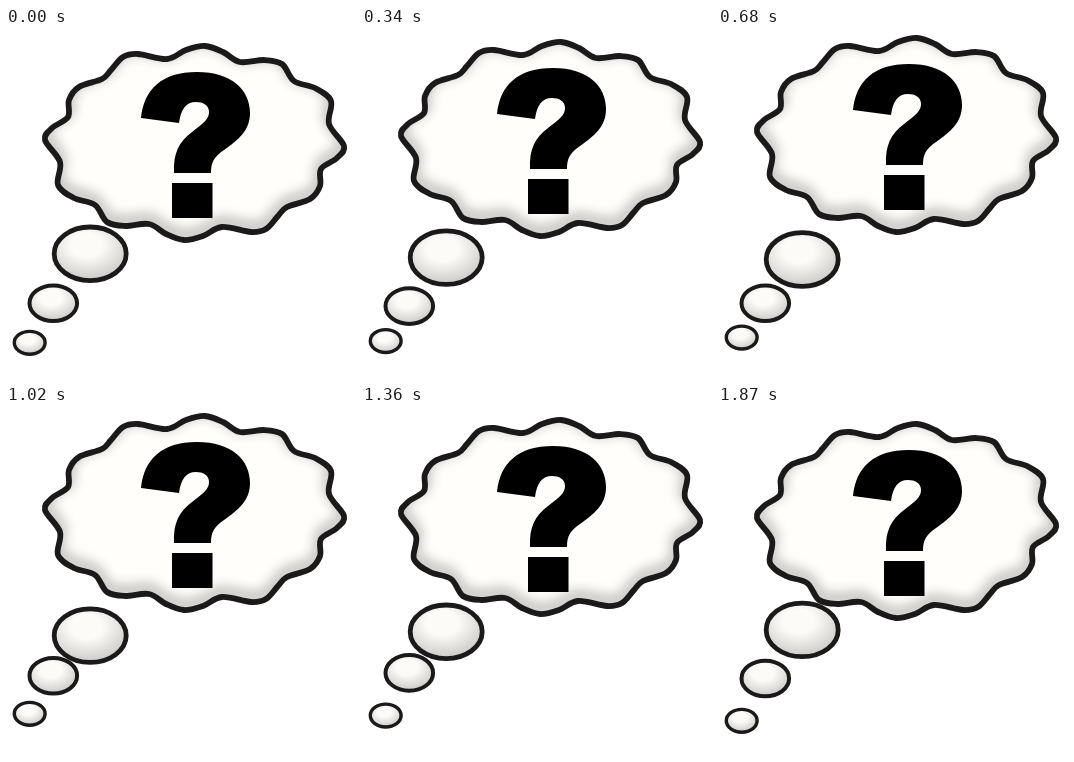
An HTML page that plays this animation: 350x350 px, repeating every 2040 ms.

```html
<!DOCTYPE html>
<html lang="en">
<head>
<meta charset="utf-8">
<title>Thought bubble</title>
<style>
  html, body { margin: 0; width: 100%; height: 100%; overflow: hidden; background: #fff; }
  svg { display: block; width: 100vw; height: 100vh; }
  ellipse { fill: url(#shade); stroke: #1a1a1a; }
  .line { fill: none; stroke: #1a1a1a; }
</style>
</head>
<body>
<svg viewBox="0 0 350 350" role="img" aria-label="Thought bubble with a question mark">
  <defs>
    <path id="outline"/>
    <clipPath id="inside"><use href="#outline"/></clipPath>
    <filter id="soft" x="-20%" y="-20%" width="140%" height="140%">
      <feGaussianBlur stdDeviation="6"/>
    </filter>
    <radialGradient id="shade" cx=".45" cy=".34" r=".64">
      <stop offset=".35" stop-color="#fcfbf8"/>
      <stop offset="1" stop-color="#cdccc9"/>
    </radialGradient>
  </defs>
  <ellipse id="small" cx="23.7" rx="15.4" ry="11.4" stroke-width="3.4"/>
  <ellipse id="middle" cx="47.3" rx="23.8" ry="17.8" stroke-width="4"/>
  <ellipse id="big" cx="84.2" rx="36" ry="26.8" stroke-width="4.800"/>
  <g id="cloud">
    <use href="#outline" fill="#fffefa"/>
    <g clip-path="url(#inside)">
      <use href="#outline" y="-5" class="line" stroke-width="12" opacity=".26" filter="url(#soft)"/>
    </g>
    <use href="#outline" class="line" stroke-width="5.8"/>
    <path d="M135 82C138 53 156 36 191 36C226 36 244 54 244 77C244 95 232 104 218 114
             C208 121 205 126 205 137H168C167 117 173 106 186 96C198 87 203 83 203 76
             C203 69 197 66 190 66C180 66 175 73 173 87ZM166 147H206.500V182H166Z"/>
  </g>
</svg>
<script>
const STEP = 170, STEPS = 12;
const $ = id => document.getElementById(id);

// Upper edge of the cloud, left to right; the lower edge is its half turn
const center = [188.5, 107];
const upper = [
  [39, 104], [46, 92], [62, 81], [63, 64], [73, 51], [96, 43], [105, 34],
  [117, 21], [132, 18], [161, 23], [180, 14], [199, 10], [217, 16],
  [234, 26], [258, 24], [276, 28], [288, 45], [309, 52], [325, 65], [323, 88]
];
const lower = upper.map(p => p.map((v, k) => 2 * center[k] - v));

// Closed Catmull-Rom curve through the points
function smooth(points) {
  const n = points.length;
  let d = "M" + points[0];
  for (let i = 0; i < n; i++) {
    const [a, b, c, e] = [-1, 0, 1, 2].map(k => points[(i + k + n) % n]);
    const lead = b.map((v, k) => v + (c[k] - a[k]) / 6);
    const trail = c.map((v, k) => v - (e[k] - b[k]) / 6);
    d += `C${lead} ${trail} ${c}`;
  }
  return d + "Z";
}
$("outline").setAttribute("d", smooth([...upper, ...lower]));

// Triangle wave with flat ends: 1 around the peak step, -1 half a loop later
function wave(step, peak) {
  const gap = Math.abs(step - peak);
  const d = Math.min(gap, STEPS - gap);
  return Math.max(-1, Math.min(1, (3 - d) / 2));
}

const parts = [
  { id: "cloud", mid: 4, amp: 4, peak: 11 },
  { id: "big", mid: 227.7, amp: 3.8, peak: 4 },
  { id: "middle", mid: 272.5, amp: 5.6, peak: 2 },
  { id: "small", mid: 311.3, amp: 3.5, peak: 0 }
];

function draw(now) {
  const step = Math.floor(now / STEP) % STEPS;
  for (const { id, mid, amp, peak } of parts) {
    $(id).setAttribute("transform", `translate(0 ${mid + amp * wave(step, peak)})`);
  }
  requestAnimationFrame(draw);
}
draw(0);
</script>
</body>
</html>
```
